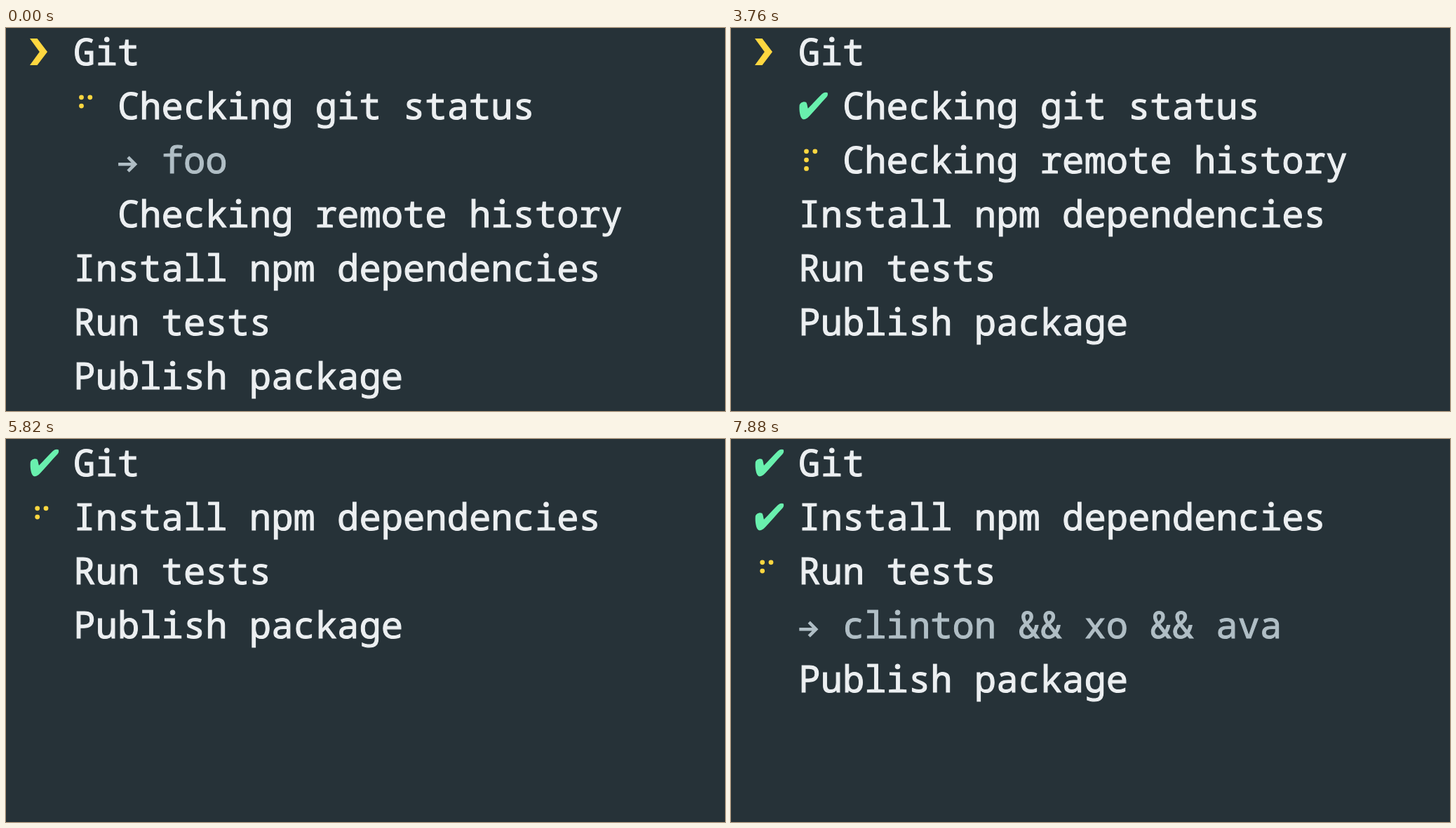
Recreate the animation shown at these times as an HTML page. Size 1025x546 px, loop 8000 ms.

```html
<!DOCTYPE html>
<html lang="en">
<head>
<meta charset="utf-8">
<title>Task list</title>
<style>
  html, body { margin: 0; width: 100%; height: 100%; overflow: hidden; background: #263238; }
  svg { display: block; width: 1025px; height: 546px; }
  text {
    font: 52.2px "Noto Sans Mono", "DejaVu Sans Mono", monospace;
    fill: #eceff1; stroke: #eceff1; stroke-width: 1.1; white-space: pre;
  }
  .dim { fill: #b0bec5; stroke: #b0bec5; }
  .arrow { fill: none; stroke: #b0bec5; stroke-width: 4.6; }
  .pointer, .dots { fill: #ffd740; }
  .check { fill: #69f0ae; }
</style>
</head>
<body>
<svg id="stage" viewBox="0 0 1025 546"></svg>
<script>
const LOOP = 8000, CELL = 31.32, LEFT = 2.4, BASE = 53, LINE = 77;

// Picture changes: first time, last time, number of steps
const RUNS = [
  [150, 1080, 7], [1230, 2270, 8], [2420, 3460, 8], [3610, 4640, 8],
  [4790, 5820, 8], [5970, 6990, 8], [7140, 7880, 6]
];
const ticks = [0];
for (const [from, to, n] of RUNS)
  for (let i = 0; i < n; i++)
    ticks.push(Math.floor((from + (to - from) * i / (n - 1)) / 10) * 10);

// Row: column, icon, text
const git = [1, 'pointer', 'Git'], gitDone = [1, 'check', 'Git'];
const install = [1, '', 'Install npm dependencies'];
const tests = [1, '', 'Run tests'];
const publish = [1, '', 'Publish package'];
const status = icon => [3, icon, 'Checking git status'];
const remote = icon => [3, icon, 'Checking remote history'];
const output = (col, text) => [col, 'arrow', text];
const withIcon = (row, icon) => [row[0], icon, row[2]];
const rest = [install, tests, publish];

// Start time, extra spinner ticks from redraws, rows
const SCREENS = [
  [0, 0, [git, status('dots'), output(5, 'foo'), remote(''), ...rest]],
  [1720, 0, [git, status('dots'), output(5, 'bar'), remote(''), ...rest]],
  [3720, 2, [git, status('check'), remote('dots'), ...rest]],
  [5720, 3, [gitDone, withIcon(install, 'dots'), tests, publish]],
  [7720, 3, [gitDone, withIcon(install, 'check'), withIcon(tests, 'dots'),
             output(3, 'clinton && xo && ava'), publish]]
];

// Lit dots: 1-3 left column, 4-6 right column
const SPIN = ['124', '145', '1456', '456', '3456', '356', '236', '1236', '123', '1234'];

const ICONS = {
  pointer: () => '<path class="pointer" d="M0-38H10.5L25-19L10.5 0H0L13.8-19Z"/>',
  check: () => '<path class="check" d="M.8-19.5C1-23.5 7-26 10-24.3C11.8-23 11.8-19 13-15.3' +
    'C20-22.5 28-31 33-36Q36.5-39 40.8-37.8Q42-34.5 39.5-31.5' +
    'C31-22.5 23-13 15-4.5Q10 1 6 .2C1.5-1 .2-13 .8-19.5Z"/>',
  arrow: () => '<path class="arrow" d="M.5-12.8H25M14.4-22.8L24.4-12.8L14.4-2.8"/>',
  dots: frame => [...SPIN[frame]].map(d => {
    const n = d - 1;
    return `<circle class="dots" cx="${10.7 + 12.3 * (n > 2)}" cy="${-31.2 + 12.3 * (n % 3)}" r="3.4"/>`;
  }).join('')
};

const stage = document.getElementById('stage');
const escapeText = s => s.replace(/&/g, '&amp;');

function drawRow([col, icon, text], i, frame) {
  const y = BASE + LINE * i;
  const x = LEFT + CELL * (col + 2);
  const mark = icon && `<g transform="translate(${34 + 31.4 * (col - 1)} ${y})">${ICONS[icon](frame)}</g>`;
  const dim = icon === 'arrow' ? ' class="dim"' : '';
  return `${mark}<text x="${x}" y="${y}"${dim}>${escapeText(text)}</text>`;
}

function render(t) {
  const [, extra, rows] = SCREENS.findLast(s => s[0] <= t);
  const frame = Math.floor(t * 0.0098 + 0.55 + extra) % SPIN.length;
  stage.innerHTML = rows.map((row, i) => drawRow(row, i, frame)).join('');
}

let shown = -1;
function play() {
  const now = performance.now() % LOOP;
  const tick = ticks.findLast(t => t <= now);
  if (tick !== shown) render(shown = tick);
  requestAnimationFrame(play);
}
play();
</script>
</body>
</html>
```
